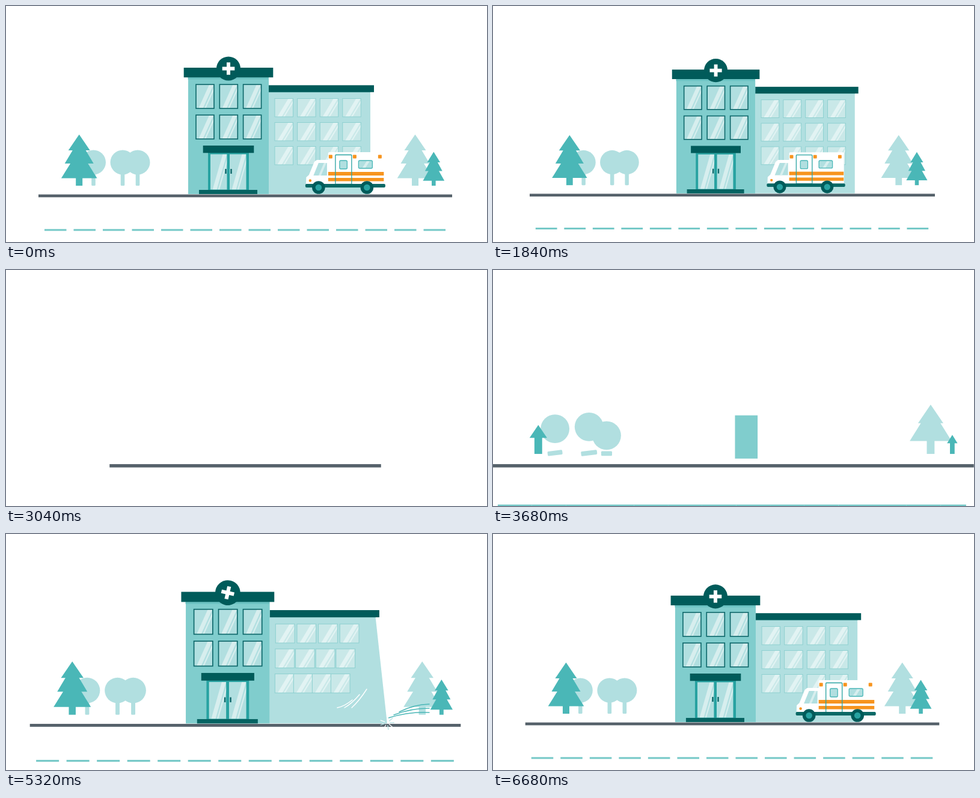
Write an HTML page with a canvas that moves like this. It is 800x394 px and loops after 6.72 s.

```html
<!DOCTYPE html>
<html lang="en">
<head>
<meta charset="utf-8">
<style>
  html, body { margin: 0; width: 100%; height: 100%; overflow: hidden; background: #fff; }
  canvas { display: block; width: 800px; height: 394px; }
</style>
</head>
<body>
<canvas id="stage"></canvas>
<script>
const W = 800, H = 394, LOOP = 6720, RESTART = 2460;
const DARK = '#005b5a', MID = '#80cdcd', LIGHT = '#b1dfe0', TEAL = '#4ab7b7',
      FRAME = '#0c6669', DOOR = '#27a2a1', PALE = '#d7eeee', ORANGE = '#f7941e', ROAD = '#55616a';

const canvas = document.getElementById('stage');
const c = canvas.getContext('2d');
const dpr = window.devicePixelRatio || 1;
canvas.width = W * dpr;
canvas.height = H * dpr;

// Easings: each runs from 0 to 1 between start and start + dur.
const part = (t, start, dur) => Math.max(0, Math.min(1, (t - start) / dur));
const rise = (t, start, dur) => 1 - (1 - part(t, start, dur)) ** 3;
const pop = (t, start, dur) => {
  const v = part(t, start, dur) - 1;
  return 1 + 3.2 * v ** 3 + 2.2 * v * v;
};
const smooth = (t, start, dur) => {
  const u = part(t, start, dur);
  return u * u * (3 - 2 * u);
};
// Goes out from 0 to 1 and back to 0.
const hump = (t, start, dur) => Math.sin(Math.PI * part(t, start, dur));

function rect(x, y, w, h, fill) {
  c.fillStyle = fill;
  c.fillRect(x, y, w, h);
}

function round(x, y, w, h, r, fill, stroke, width = 1.3) {
  c.beginPath();
  c.roundRect(x, y, w, h, r);
  if (fill) { c.fillStyle = fill; c.fill(); }
  if (stroke) { c.strokeStyle = stroke; c.lineWidth = width; c.stroke(); }
}

function disc(x, y, r, fill) {
  c.beginPath();
  c.arc(x, y, r, 0, 7);
  c.fillStyle = fill;
  c.fill();
}

function poly(points, fill) {
  c.beginPath();
  points.forEach(([x, y]) => c.lineTo(x, y));
  c.closePath();
  c.fillStyle = fill;
  c.fill();
}

// Runs draw with the origin moved to x, y, then turned and scaled.
function at(x, y, sx, sy, deg, draw) {
  c.save();
  c.translate(x, y);
  c.rotate(deg * Math.PI / 180);
  c.scale(sx, sy);
  draw();
  c.restore();
}

function pane(x, y, w, h, stroke, width, fill = LIGHT, shine = PALE) {
  if (w < 1 || h < 1) return;
  const streak = (from, size) => poly(
    [[x + w * from, y + h], [x + w * (from + .6), y], [x + w * (from + .6 + size), y], [x + w * (from + size), y + h]], shine);
  c.save();
  c.beginPath();
  c.rect(x, y, w, h);
  c.clip();
  rect(x, y, w, h, fill);
  streak(.14, .24);
  streak(.46, .08);
  c.restore();
  c.strokeStyle = stroke;
  c.lineWidth = width;
  c.strokeRect(x, y, w, h);
}

function pine(t, x, sx, sy, color, start) {
  const g = part(t, start, 500);
  const top = rise(g, 0, .5), low = rise(g, .3, .3), mid = rise(g, .62, .38);
  const tier = (base, half, tall, k) =>
    poly([[-half * k, base], [0, base - tall * k], [half * k, base]], color);
  at(x, 300, sx, sy, 0, () => {
    rect(-5.5, -36 * top, 11, 36 * top, color);
    tier(-12.5 - 6 * (1 - mid), 29.8, 48, low);
    tier(-37, 24, 40.5, mid);
    tier(-59 + 15 * (1 - mid) + 21 * (1 - low), 18, 26.5, top);
  });
}

function bush(t, x, start, turn) {
  const up = rise(t, start, 500), stand = rise(t, turn, 420);
  at(x, 299.5 - 11 * stand, up, 1, -90 * stand, () => round(-11.5, -3.3, 23, 6.6, 1.5, LIGHT));
  disc(x, 300 - 39 * up, 20.5 * Math.min(1, up * 1.5), LIGHT);
}

function trees(t) {
  bush(t, 145.5, 3395, 3670);
  bush(t, 194, 3280, 3670);
  bush(t, 219, 3525, 3690);
  pine(t, 121.7, 1, 1, TEAL, 3600);
  pine(t, 680.5, 1, 1, LIGHT, 3380);
  pine(t, 711.3, .6, .66, TEAL, 3600);
}

function ground(t) {
  const w = 688 * rise(t, 2940, 420);
  rect(398 - w / 2, 314.6, w, 4.7, ROAD);
  const half = 333.5 * rise(t, 3250, 400);
  const len = 48.6 - 12.1 * smooth(t, 3700, 540);
  for (let i = 0; i < 14; i++) {
    const x = 64 + 48.5 * i;
    const a = Math.max(x, 397.5 - half), b = Math.min(x + len, 397.5 + half);
    if (b > a) rect(a, 372.4, b - a, 3, '#74c8c7');
  }
}

function wing(t) {
  const shut = 1 - rise(t, 4440, 640);
  if (shut === 1) return;
  const angle = 80 * shut, rad = angle * Math.PI / 180, y = 138 + 61 * shut;
  const fall = smooth(t, 4640, 340);
  const tip = [437 + 169 * Math.cos(rad), y + 6 + 169 * Math.sin(rad)];
  const foot = [606 - 34 * (1 - fall) + 18.5 * hump(t, 5080, 480), tip[1] + (314 - tip[1]) * fall];
  poly([[437, y], tip, foot, [437, 306 + 8 * fall]], LIGHT);

  for (let row = 0; row < 3; row++) {
    const spread = rise(t, 5100 + 29 * row, 400);
    const size = 30.5 * Math.min(1, spread * 1.6);
    for (let i = 0; i < 4; i++)
      pane(447 - 8 * (1 - spread) + 37.6 * i * spread, 154.5 + 40 * row, size, size, '#8ed0d0', 1, '#c9e8e8', '#e2f3f3');
  }
  at(437, y, 1, 1, angle, () => {
    rect(0, 5, 169, 2, '#9cd6d6');
    rect(0, -5.7, 175, 11.5, DARK);
  });
}

function entrance(t, dy) {
  const up = rise(t, 4260, 220), wide = rise(t, 4160, 200), sweep = rise(t, 4260, 700);
  const h = (62 - dy) * up, y = 307 - h;
  rect(336, y, 68, h, DOOR);
  for (const side of [-1, 1]) {
    pane(355.5 + 16 * side, y + 2, 28.5 - 0, h - 2, DOOR, 1);
    rect(368.8 + 4.5 * side, 307 - 35 * up, 2.4, 8 * up, FRAME);
  }
  rect(327.7, y - 12 * up, 84.6 * sweep, 12.3 * up, DARK);
  rect(369.5 - 48.5 * wide, 307, 97 * wide, 7, '#056362');
}

function badge(t, lift) {
  const size = pop(t, 4440, 370);
  at(370, 104.5 + lift, size, size, 13 * (1 - smooth(t, 5300, 320)), () => {
    disc(0, 0, 20, DARK);
    rect(-10.3, -3, 20.6, 6, '#fff');
    rect(-3, -10.3, 6, 20.6, '#fff');
  });
}

function tower(t) {
  const wide = smooth(t, 3540, 420);
  if (!wide) return;
  const left = 437 - 134 * wide, right = 437 - 4 * (1 - wide);
  const foot = 314 - 10 * Math.sin(Math.PI * wide);
  const lift = 18 * (1 - rise(t, 3680, 400)) + 108 * (1 - smooth(t, 4080, 709));
  const top = 119 + lift, dy = .75 * lift, roof = rise(t, 4090, 180);
  if (right > left) rect(left, top, right - left, foot - top, MID);
  rect(369.5 - 67 * roof, top, 134 * roof, 3.5, '#6cc3c3');
  rect(370 - 74.3 * roof, top - 16, 148.6 * roof, 16.2, DARK);

  entrance(t, dy);
  for (let col = 0; col < 3; col++) {
    const w = 30 * rise(t, 4400, 200), h = 40 * rise(t, 4400, 380);
    const x = 331 + 39.3 * col - w / 2, y = 131 + dy * (1 - col * .12);
    pane(x, y + 51 * rise(t, 4420 + 30 * col, 450), w, h, FRAME, 1.6);
    pane(x, y, w, h, FRAME, 1.6);
  }
  badge(t, lift);
}

function vanBody() {
  poly([[537, 257], [517, 257], [513, 260], [504, 282], [499.5, 286], [499, 300], [537, 300]], '#fff');
  round(536, 244, 93, 57, 2, '#fff');
  poly([[520, 262], [534, 262], [534, 283], [511.5, 283]], LIGHT);
  poly([[520, 283], [529, 262], [533, 262], [524, 283]], PALE);
  rect(536, 277, 92.5, 6, ORANGE);
  rect(536, 287, 92.5, 5.5, ORANGE);
  for (const x of [537, 577, 619]) round(x, 248.5, 6, 6, 1, ORANGE);
  disc(506, 291.5, 2.2, ORANGE);
  round(548, 248.5, 27, 49, 1, null, DOOR);
  round(555, 258, 12.5, 14, 2, LIGHT, TEAL);
  round(586.5, 258, 23, 13, 2, LIGHT, TEAL);
  poly([[593, 270], [600, 259], [605, 259], [598, 270]], PALE);
  round(498, 297, 133, 6, 2, '#0a6966');
}

// Drives in at a steady speed, then brakes and nods.
function ambulance(t) {
  const size = pop(t, 5960, 220), run = t - LOOP;
  const dx = run < 0 ? -run * .142 : -41.5 * (1 - Math.exp(-run / 300));
  at(564 + dx, 314, size, size, 0, () => {
    c.translate(-564, -314);
    at(520, 303, 1, 1, -2.1 * hump(run, 480, 640), () => {
      c.translate(-520, -303);
      vanBody();
    });
    for (const x of [520, 600.5]) {
      disc(x, 303, 10.8, DARK);
      disc(x, 303, 5.3, DOOR);
    }
  });
}

// Bowed line, drawn from its first end up to a share of its length.
function swoosh(x0, y0, x1, y1, bend, color, share) {
  c.beginPath();
  c.moveTo(x0, y0);
  c.quadraticCurveTo((x0 + x1) / 2, (y0 + y1) / 2 + bend, x1, y1);
  c.strokeStyle = color;
  c.lineWidth = 1.4;
  c.lineCap = 'round';
  c.setLineDash([1.1 * share * Math.hypot(x1 - x0, y1 - y0), 600]);
  c.stroke();
  c.setLineDash([]);
}

// Short-lived lines: draw gets the share shown and the progress.
function flash(t, start, dur, draw) {
  const u = part(t, start, dur);
  if (u === 0 || u === 1) return;
  c.save();
  c.globalAlpha = Math.min(1, (1 - u) * 2);
  draw(Math.min(1, u * 2.3), u);
  c.restore();
}

function impact(share) {
  for (let i = 0; i < 3; i++) {
    swoosh(636 + 9 * i, 307 - 5 * i, 704, 298 - 7 * i, -6, TEAL, share);
    swoosh(551 + 12 * i, 290, 576 + 12 * i, 277 - 9 * i, 4, '#fff', share);
  }
  for (let deg = 0; deg < 360; deg += 40)
    at(634, 315, 1, 1, deg, () => rect(4, -.6, 8, 1.2, deg % 80 ? '#fff' : LIGHT));
}

function skid(share, u) {
  const color = '#c3e5e5';
  c.translate(14 - 35 * u, 0);
  swoosh(246, 340, 72, 349, -24, color, share);
  swoosh(343, 358, 256, 359, 4, color, share);
  swoosh(401, 342, 349, 330, 6, color, share);
}

function draw(time) {
  const t = time < RESTART ? time + LOOP : time;
  const zoom = .97 + .198 * Math.exp(-Math.max(0, t - 3680) / 1613);
  c.setTransform(dpr, 0, 0, dpr, 0, 0);
  rect(0, 0, W, H, '#fff');
  at(398, 258, zoom, zoom, 0, () => {
    c.translate(-398, -258);
    trees(t);
    wing(t);
    tower(t);
    ground(t);
    ambulance(t);
  });
  flash(t, 5200, 240, impact);
  flash(t, LOOP + 600, 480, skid);
  const iris = Math.min(525 * part(time, 2080, 320), 368 + (2640 - time) * 1.03);
  disc(399.5, 327, Math.max(0, iris), LIGHT);
}

const start = performance.now();
function tick() {
  draw((performance.now() - start) % LOOP);
  requestAnimationFrame(tick);
}
tick();
</script>
</body>
</html>
```
